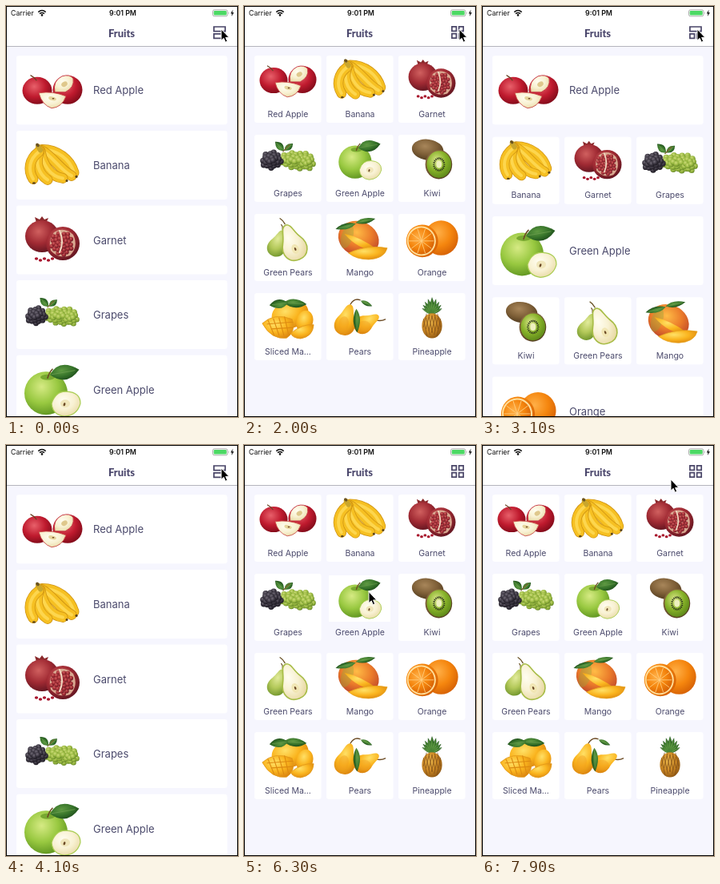
These frames come from a looping animation (290x514 px, 8000 ms). An HTML page:

```html
<!DOCTYPE html>
<html lang="en">
<head>
<meta charset="utf-8">
<title>Fruits</title>
<style>
  html, body { margin: 0; width: 100%; height: 100%; overflow: hidden; background: #f6f6fe; }
  svg { display: block; width: 290px; height: 514px; }
  text { font-family: Inter, Roboto, sans-serif; fill: #4b4a6c; white-space: pre; }
  .title { font: 800 13px Lato, "Open Sans", sans-serif; fill: #48446a; }
  .status { font-size: 8.8px; fill: #111; }
  .icon { fill: none; stroke: #4a4668; stroke-width: 1.7; }
</style>
</head>
<body>
<svg viewBox="0 0 290 514" xmlns="http://www.w3.org/2000/svg">
  <defs id="defs"></defs>
  <rect width="290" height="514" fill="#f6f6fe"/>
  <g id="cards"></g>

  <rect width="290" height="50" fill="#fff"/>
  <rect y="50" width="290" height="1" fill="#b4b4bc"/>
  <text class="status" x="6" y="12.3">Carrier</text>
  <g fill="none" stroke="#111" stroke-width="1.5">
    <path d="M40.3 7.6Q45 3.4 49.7 7.6M42 9.7Q45 7.2 48 9.7"/>
    <circle cx="45" cy="11.4" r=".6"/>
  </g>
  <text class="status" x="146" y="12.3" text-anchor="middle" font-weight="600">9:01 PM</text>
  <rect x="258.5" y="4.8" width="18.4" height="8" rx="2" fill="none" stroke="#999" stroke-width=".8"/>
  <rect x="259.7" y="6" width="16" height="5.6" rx="1" fill="#4cd964"/>
  <path d="M278 7.2q1.3 1.6 0 3.2z" fill="#999"/>
  <path d="M283.6 4.6L280.8 9.4H282.6L281.8 13L285 8.2H283z" fill="#111"/>
  <text class="title" x="144.5" y="38.6" text-anchor="middle">Fruits</text>
  <path id="icon" class="icon"/>

  <rect x=".5" y=".5" width="289" height="513" fill="none" stroke="#000"/>
  <path id="cursor" d="M0 0V14.2L3.2 11.3L5.3 16.2L7.7 15.1L5.6 10.4H9.9Z"
        fill="#000" stroke="#fff" stroke-width="1" stroke-linejoin="round"/>
</svg>

<script>
const $ = id => document.getElementById(id);
const LOOP = 8000, MOVE = 500;

// ---------- artwork helpers ----------
const shades = {
  red: ['#e8606a', '#bf1a2e', '#7c0a18'],
  garnet: ['#d0605f', '#a02a33', '#5e141f'],
  flesh: ['#fffdf0', '#f8f1d2', '#e8d9a4'],
  green: ['#d6ea84', '#98c840', '#5c921f'],
  grape: ['#cddc78', '#98b840', '#5f8024'],
  pear: ['#e2eb9c', '#b4c95a', '#74982f'],
  brown: ['#a8865a', '#7f6038', '#503a1e'],
  kiwi: ['#dbe68a', '#86b128', '#5a8518'],
  gold: ['#ffe066', '#fab41e', '#dc8610'],
  mango: ['#ffbc46', '#ea7a2a', '#b8402a'],
  orange: ['#ffb048', '#f5860e', '#d45f04'],
  leaf: ['#5f9a42', '#37742a', '#1c4a1a'],
  dark: ['#706a76', '#38333e', '#19161e'],
  pine: ['#efba4c', '#cc8824', '#8c5512']
};
$('defs').innerHTML = Object.entries(shades).map(([id, c]) =>
  `<radialGradient id="${id}" cx=".4" cy=".35" r=".7">` +
  c.map((s, i) => `<stop offset="${[0, .55, 1][i]}" stop-color="${s}"/>`).join('') +
  '</radialGradient>').join('');

const paint = c => c in shades ? `url(#${c})` : c;
const oval = (x, y, rx, ry, c, rot = 0, extra = '') =>
  `<ellipse rx="${rx}" ry="${ry}" fill="${paint(c)}" transform="translate(${x} ${y}) rotate(${rot})" ${extra}/>`;
const shape = (d, c, extra = '') => `<path d="${d}" fill="${paint(c)}" ${extra}/>`;
const line = (d, c, w) =>
  `<path d="${d}" fill="none" stroke="${c}" stroke-width="${w}" stroke-linecap="round"/>`;
const edge = (c, w) => `stroke="${c}" stroke-width="${w}"`;
const repeat = (n, f) => Array.from({ length: n }, (_, i) => f(i)).join('');
const leaf = (x, y, len, rot, wide = .3) =>
  `<g transform="translate(${x} ${y}) rotate(${rot})">` +
  shape(`M0 0Q${len * .4} ${-len * wide * 1.4} ${len} 0Q${len * .5} ${len * wide * 1.4} 0 0Z`, 'leaf') +
  line(`M2 0H${len * .85}`, '#6f9f52', .7) + '</g>';
const pear = (x, y, s, rot, c, extra = '') =>
  `<g transform="translate(${x} ${y}) rotate(${rot}) scale(${s})">` +
  shape('M0-30C8-30 8-16 14-6C24 10 16 26 0 26C-16 26-24 10-14-6C-8-16-8-30 0-30Z', c, extra) + '</g>';
// sunflower spread inside an ellipse
const cluster = (n, x, y, rx, ry, r, c) => repeat(n, i => {
  const k = n - 1 - i, a = k * 2.4, d = Math.sqrt((k + .5) / n);
  return oval(x + rx * d * Math.cos(a), y + ry * d * Math.sin(a), r, r, c);
});
const ring = (n, x, y, rx, ry, f) => repeat(n, i => {
  const a = i / n * Math.PI * 2;
  return f(x + rx * Math.cos(a), y + ry * Math.sin(a), a * 180 / Math.PI);
});
const banana = d => line(d, '#cf9312', 13) + line(d, '#f6c022', 11.4) + line(d, '#fdd64e', 4);

// each fruit: label, width and height at full size, drawing around 0,0
const fruits = [
  ['Red Apple', 76, 46,
    oval(-19, 0, 18.5, 17, 'red') + line('M-20-13Q-23-17-27-19', '#6a4424', 1.3) +
    oval(19, -1, 18.5, 18, 'red') +
    shape('M3 2Q0-12 12-18Q22-21 26-15Q28-4 16 2Z', 'flesh', edge('#c4303f', .9)) +
    oval(15, -8, 4, 3, '#dfc88c', -30) +
    shape('M-17 3Q0 0 17 7Q12 21-1 22Q-13 18-17 3Z', 'flesh', edge('#c94a46', .9)) +
    oval(0, 10, 5, 2.4, '#e6d59c', 15) + oval(1, 10, 1.4, .8, '#6a3c1c')],
  ['Banana', 67, 54,
    banana('M-13-20C6-20 22-8 27 9') + banana('M-14-19C-2-14 10 6 24 13') +
    banana('M-15-18C-12 0-2 14 13 16') + banana('M-16-18C-22-4-18 10-6 18') +
    banana('M-17-17C-29-8-31 6-24 17') +
    line('M-18-24L-15-19', '#c9a62c', 6) + line('M-19-26L-18-25', '#6a5222', 3.5) +
    oval(30, 14, 1.6, 1.6, '#5a431a') + oval(18, 19, 1.5, 1.5, '#5a431a') + oval(-23, 22, 2, 1.2, '#5a431a')],
  ['Garnet', 68, 60,
    shape('M-20-22L-22-29L-16-26L-13-30L-10-26L-5-28L-8-21Z', '#8a2a2c') +
    oval(-13, -5, 21, 20, 'garnet') + oval(13, 4, 21, 21, 'garnet') +
    shape('M2-10Q14-18 26-7Q33 8 22 19Q8 24-2 13Q-6 0 2-10Z', '#d9a890') +
    cluster(34, 12, 4, 14, 14.5, 2.8, 'garnet') + line('M9-12Q15 2 9 15', '#f0d8c0', 2) +
    repeat(5, i => oval(-20 + i * 5, 23 + i % 2 * 2, 2.2, 1.8, '#a8142c'))],
  ['Grapes', 70, 42,
    leaf(-5, -11, 15, -135, .4) + leaf(-4, -11, 13, -40, .4) + line('M-6-10L2-18', '#75632e', 1.3) +
    cluster(34, 11, 1, 20, 10, 3.7, 'grape') + cluster(12, 24, 3, 8, 8, 3.5, 'grape') +
    cluster(24, -20, 1, 12, 10, 3.6, 'dark')],
  ['Green Apple', 70, 68,
    oval(-8, 4, 27, 27, 'green') + oval(-6, -16, 9, 3.5, '#78a830') +
    line('M-6-15Q-4-22 0-26', '#6b4a24', 1.6) + leaf(-3, -19, 37, -10, .36) +
    shape('M-1 17Q4 1 18 2Q35 3 35 17Q31 32 15 33Q0 31-1 17Z', 'flesh', edge('#a9cd52', 1.2)) +
    oval(16, 17, 6, 5, '#f0e6ba') + oval(15, 18, 1.3, 2.2, '#6c4a26', 20)],
  ['Kiwi', 67, 68,
    oval(-7, -16, 26, 17, 'brown', 8) +
    oval(11, 8, 22, 24, 'brown') + oval(11.5, 8, 20, 22, 'kiwi') + oval(11.5, 8, 4.5, 6, '#edf0bf') +
    ring(20, 11.5, 8, 8.5, 10, (x, y, a) => oval(x, y, 1.8, .9, '#28301a', a))],
  ['Green Pears', 61, 68,
    line('M-9-15Q-8-20-11-23', '#6b5428', 1.4) +
    pear(-17, 9, .8, 22, 'pear') + line('M-5-24Q-8-30-13-33', '#6b5428', 1.8) +
    pear(8, 8, 1.08, -22, 'flesh', edge('#a8bd48', 2)) +
    oval(12, 17, 6, 8, '#f1e6b4', -22) + oval(12, 17, 1.5, 2.8, '#6c4a26', -22)],
  ['Mango', 76, 58,
    oval(-2, 0, 29, 24, 'mango', 22) + oval(-18, -3, 8, 17, '#9aa63a', 18, 'opacity=".4"') +
    leaf(-6, -22, 28, -12, .2) + leaf(-6, -21, 29, 165, .2) +
    shape('M-22-7Q2-2 25 16Q0 18-22-7Z', 'gold') +
    shape('M-16 20Q10 8 38 13Q34 28 12 29Q-5 29-16 20Z', 'gold', edge('#e8a41e', .8))],
  ['Orange', 76, 53,
    oval(12, -1, 22.5, 23, 'orange') +
    oval(-13, 3, 21, 21.5, 'orange', -12) + oval(-14, 3, 19, 19.5, '#ffdf9c', -12) +
    oval(-14, 3, 17, 17.5, 'orange', -12) +
    ring(10, -14, 3, 16, 16.5, (x, y) => line(`M-14 3L${x} ${y}`, '#ffd083', .9))],
  ['Sliced Ma...', 74, 60,
    oval(3, -5, 27, 20, 'gold', -16) + oval(24, 5, 12, 16, 'gold', 15) +
    leaf(-6, -22, 33, 4, .26) + leaf(0, -22, 27, 172, .34) +
    shape('M-37 8Q-20-8 6 2Q12 20-2 29Q-24 32-37 8Z', 'gold', edge('#e39a1a', 1)) +
    repeat(4, i => line(`M${-29 + i * 8} ${3 - i * 1.5}L${-20 + i * 7} 25`, '#dd8a10', 1.3)) +
    repeat(2, i => line(`M${-30 + i * 6} ${9 + i * 7}L7 ${6 + i * 8}`, '#dd8a10', 1.3)) +
    shape('M4 22Q22 8 37 10Q36 27 18 30Q6 29 4 22Z', 'gold', edge('#e39a1a', 1))],
  ['Pears', 74, 56,
    line('M-13-18Q-8-27 0-24', '#6b4a24', 1.4) + line('M22 3Q28 5 34 2', '#6b4a24', 1.5) +
    pear(8, 7, .66, 60, 'gold') + pear(-19, 4, .76, 16, 'gold') +
    oval(-22, 8, 7, 10, '#f09a1e', 10, 'opacity=".4"') + oval(6, 11, 9, 7, '#f09a1e', 10, 'opacity=".4"') +
    leaf(-5, -12, 32, 88, .2) + leaf(1, -23, 17, 25, .24)],
  ['Pineapple', 42, 68,
    repeat(9, i => leaf(0, -6, 28 - Math.abs(i - 4) * 2.2, -150 + i * 15, .17)) +
    oval(0, 13, 16.5, 20.5, 'pine') +
    repeat(6, i => line(`M${-14 + i * 4.6} ${2 - i * 1.7}L${-8 + i * 4.4} ${30 - i * 3}`, '#7a4a16', .9) +
                   line(`M${14 - i * 4.6} ${2 - i * 1.7}L${8 - i * 4.4} ${30 - i * 3}`, '#7a4a16', .9))]
];

$('cards').innerHTML = fruits.map(([name, , , art]) =>
  `<g><rect rx="3" fill="#fff"/><rect x="3" y="2" width="77" height="58" fill="#fff"/>` +
  `<g>${art}</g><text>${name}</text></g>`).join('');
const cards = [...$('cards').children].map((g, i) => {
  const [box, , pic, label] = g.children, [, w, h] = fruits[i];
  return { g, box, pic, label, small: Math.min(72 / w, 52 / h) };
});

// ---------- layouts ----------
const wide = y => ({ x: 13, y, w: 263.5, h: 86, big: 1 });
const tile = (col, y) => ({ x: 13 + col * 90, y, w: 83.5, h: 84, big: 0 });
const bar = 'M259.9 26H274V31.6H259.9Z';
const list = { cell: i => wide(62.3 + i * 93.6), icon: bar + 'M259.9 34.8H274V40.4H259.9Z' };
const grid = {
  cell: i => tile(i % 3, 62 + Math.floor(i / 3) * 99),
  icon: [[0, 0], [8.8, 0], [0, 8.8], [8.8, 8.8]]
    .map(([x, y]) => `M${259.9 + x} ${25.9 + y}h5.5v5.5h-5.5z`).join('')
};
const mixed = {
  cell(i) {
    const top = 62.3 + Math.floor(i / 4) * 200.6, k = i % 4;
    return k ? tile(k - 1, top + 101.4) : wide(top);
  },
  icon: bar + 'M259.9 34.8h5.6v5.6h-5.6zM268.6 34.8h5.4v5.6h-5.4z'
};
const steps = [[-MOVE, list], [300, grid], [2200, mixed], [3450, list], [4853, grid]];

// ---------- motion ----------
const lerp = (a, b, p) => a + (b - a) * p;
const clamp = v => Math.max(0, Math.min(1, v));
const ease = p => p < .5 ? 2 * p * p : 1 - 2 * (1 - p) ** 2;
const set = (el, attrs) => { for (const k in attrs) el.setAttribute(k, attrs[k]); };

const path = [[0, 269, 29], [5500, 269, 29], [6150, 156, 183.5], [6700, 156, 183.5], [7750, 236, 43], [LOOP, 236, 43]];
function cursorAt(t) {
  const n = path.findIndex(k => k[0] > t), a = path[n - 1], b = path[n];
  const p = ease((t - a[0]) / (b[0] - a[0]));
  return [lerp(a[1], b[1], p), lerp(a[2], b[2], p)];
}

function place(card, i, from, to, p, pressed) {
  // rows not yet on screen in the list appear in place
  if (from === list && to === grid && i > 5) p = 1;
  const a = from.cell(i), b = to.cell(i);
  const [x, y, w, h, big] = ['x', 'y', 'w', 'h', 'big'].map(k => lerp(a[k], b[k], p));
  const size = lerp(10.5, 13, big);
  set(card.g, { transform: `translate(${x} ${y})` });
  // a touch clears the card's backing, the picture keeps its own
  set(card.box, { width: w, height: h, opacity: pressed ? 0 : 1 });
  set(card.pic, { transform: `translate(${lerp(42, 45, big)} ${lerp(31, 43.5, big)}) scale(${lerp(card.small, 1, big)})` });
  set(card.label, {
    x: b.big ? lerp(10, 96, big) : lerp(42, 136, big),
    y: lerp(73, 43.5, big) + size * .36,
    'font-size': size,
    'text-anchor': b.big ? 'start' : 'middle'
  });
}

function render(t) {
  const n = steps.findLastIndex(s => s[0] <= t);
  const [start, to] = steps[n], from = steps[Math.max(0, n - 1)][1];
  const p = ease(clamp((t - start) / MOVE));
  const touching = t >= 6200 && t < 6500;
  cards.forEach((c, i) => place(c, i, from, to, p, touching && i === 4));
  set($('icon'), { d: to.icon });
  set($('cursor'), { transform: `translate(${cursorAt(t)})` });
}

const begin = performance.now();
function tick() {
  render((performance.now() - begin) % LOOP);
  requestAnimationFrame(tick);
}
tick();
</script>
</body>
</html>
```
